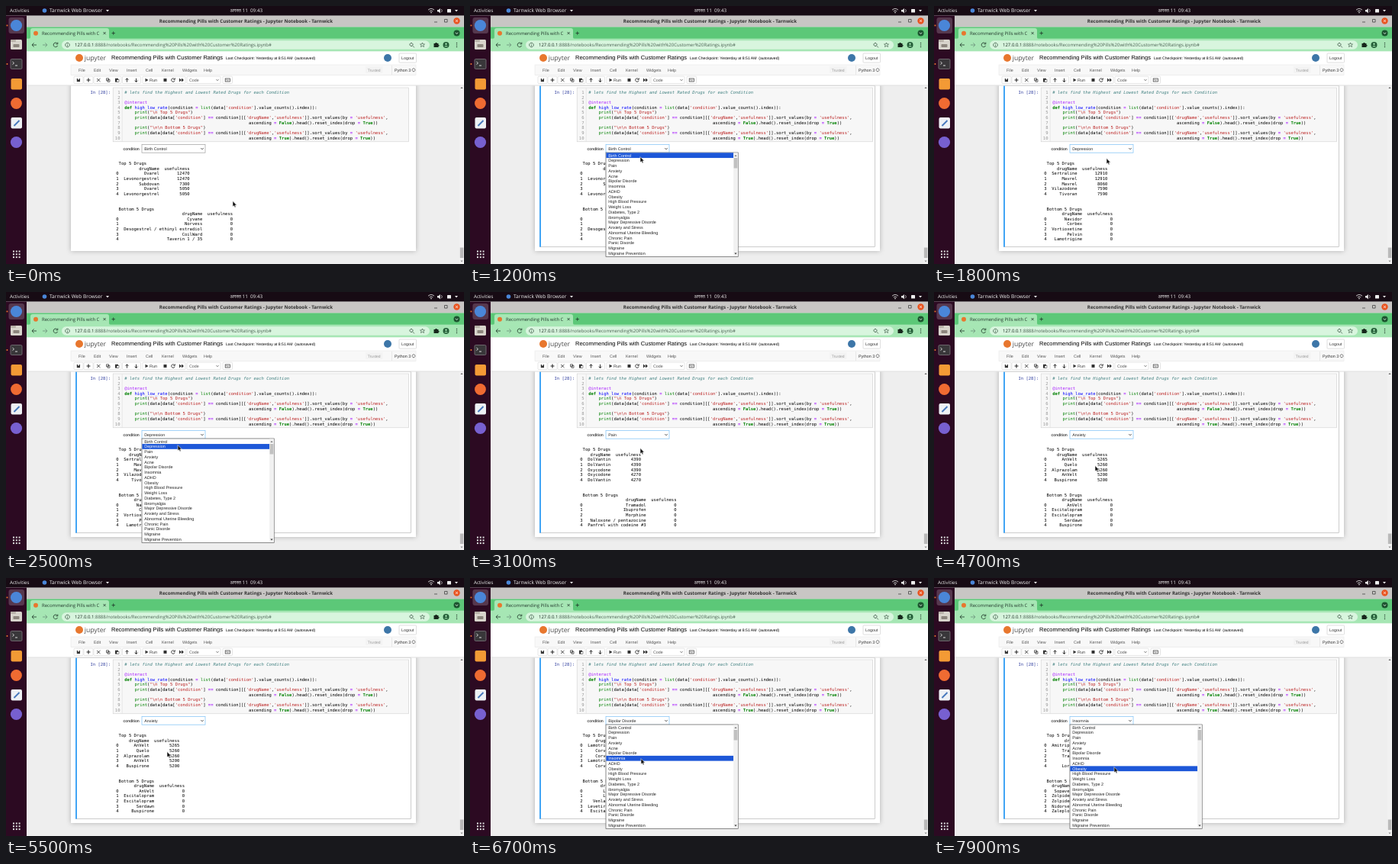
These frames come from a looping animation (600x338 px, 8000 ms). An HTML page:

```html
<!DOCTYPE html>
<html lang="en">
<head>
<meta charset="utf-8">
<title>Notebook dropdown</title>
<style>
html, body { margin: 0; width: 100%; height: 100%; overflow: hidden; background: #eee; }
svg { display: block; width: 600px; height: 338px; }
text { white-space: pre; text-rendering: geometricPrecision; }
.ui { font-family: "Open Sans", "Noto Sans", sans-serif; }
.page { font-family: "Liberation Sans", Arial, sans-serif; }
.mono { font-family: "DejaVu Sans Mono", monospace; font-size: 5.53px; }
.sheet { filter: drop-shadow(0 0 3px rgba(60, 60, 60, .35)); }
</style>
</head>
<body>
<svg id="stage" viewBox="0 0 600 338"></svg>
<script>
const stage = document.getElementById('stage');
const LOOP = 8000, STEP = 100;
const ROW = 6.76, LIST_TOP = 192.3, LINE = 6.62;
const NAME = 'Recommending Pills with Customer Ratings';
const ORANGE = '#e8772e';

const esc = s => String(s).replace(/&/g, '&amp;').replace(/</g, '&lt;');
const rect = (x, y, w, h, fill, more = '') =>
  `<rect x="${x}" y="${y}" width="${w}" height="${h}" fill="${fill}" ${more}/>`;
const dot = (x, y, r, fill, more = '') => `<circle cx="${x}" cy="${y}" r="${r}" fill="${fill}" ${more}/>`;
const line = (d, color, w = .8, more = '') =>
  `<path d="${d}" fill="none" stroke="${color}" stroke-width="${w}" ${more}/>`;
const fill = (d, color, more = '') => `<path d="${d}" fill="${color}" ${more}/>`;
const text = (x, y, s, size, color, cls = 'page', more = '') =>
  `<text x="${x}" y="${y}" font-size="${size}" fill="${color}" class="${cls}" ${more}>${esc(s)}</text>`;
const mono = (x, y, s, color = '#000', more = '') =>
  `<text x="${x}" y="${y}" fill="${color}" class="mono" ${more}>${s}</text>`;

// Output of each selected condition: two lists of [drug, usefulness].
const zeros = names => names.map(n => [n, 0]);
const pair = (names, scores) => names.map((n, i) => [n, scores[i]]);
const RESULTS = {
  'Birth Control': [
    pair(['Ovarel', 'Levonorgestrel', 'Subdovan', 'Ovarel', 'Levonorgestrel'], [12470, 12470, 7300, 5050, 5050]),
    zeros(['Cyvane', 'Norvess', 'Desogestrel / ethinyl estradiol', 'CoilWard', 'Taverin 1 / 35'])],
  'Depression': [
    pair(['Sertraline', 'Mavrel', 'Mavrel', 'Vilazodone', 'Tivoran'], [12910, 12910, 8060, 7590, 7590]),
    zeros(['Navidor', 'Corbex', 'Vortioxetine', 'Pelvin', 'Lamotrigine'])],
  'Pain': [
    pair(['DolVantin', 'DolVantin', 'Oxycodone', 'Oxycodone', 'DolVantin'], [4390, 4390, 4390, 4270, 4270]),
    zeros(['Tramadol', 'Ibuprofen', 'Morphine', 'Naloxone / pentazocine', 'Panfrel with codeine #3'])],
  'Anxiety': [
    pair(['AnVelt', 'Quelo', 'Alprazolam', 'AnVelt', 'Buspirone'], [5265, 5260, 5260, 5200, 5200]),
    zeros(['AnVelt', 'Escitalopram', 'Escitalopram', 'Serdawn', 'Buspirone'])],
  'Bipolar Disorde': [
    pair(['Lamotrigine', 'Corvetal', 'Corvetal', 'Lamotrigine', 'Corvetal'], [5510, 5510, 4380, 4380, 3920]),
    zeros(['Lithium', 'Lorvane', 'Venlafaxine', 'Levetiracetam', 'Escitalopram'])],
  'Insomnia': [
    pair(['Amitriptyline', 'Trazodone', 'Trazodone', 'Dormel', 'Lorazepam'], [4770, 4250, 4250, 3810, 3640]),
    zeros(['Sopavel', 'Zolpidem', 'Zolpidem', 'Nidorsel', 'Zaleplon'])],
};
const CONDITIONS = ['Birth Control', 'Depression', 'Pain', 'Anxiety', 'Acne', 'Bipolar Disorde', 'Insomnia',
  'ADHD', 'Obesity', 'High Blood Pressure', 'Weight Loss', 'Diabetes, Type 2', 'ibromyalgia',
  'Major Depressive Disorde', 'Anxiety and Stress', 'Abnormal Uterine Bleeding', 'Chronic Pain',
  'Panic Disorde', 'Migraine', 'Migraine Prevention'];

// time, x, y of the pointer tip
const PATH = [[0, 297, 256], [200, 294, 252], [800, 222, 188], [1000, 222, 190], [1200, 223, 198],
  [1500, 225, 203], [1800, 226, 200], [2200, 226, 188], [2300, 226, 189], [2500, 225, 201],
  [2800, 224, 209], [3100, 223, 205], [3500, 222, 188], [3600, 222, 190], [3800, 222.5, 205.5],
  [4200, 215, 216], [4500, 211, 228], [5500, 211, 228], [5800, 216, 188], [5900, 218, 196],
  [6100, 224, 230], [6400, 223, 188], [6500, 223, 190], [6700, 224, 237], [6900, 224, 237],
  [7400, 227, 188], [7500, 228, 192], [7900, 236, 248], [8000, 236, 248]];
// time, selected condition, list open
const STATES = [[0, 'Birth Control', 0], [900, 'Birth Control', 1], [1500, 'Depression', 0],
  [2300, 'Depression', 1], [2800, 'Pain', 0], [3600, 'Pain', 1], [4200, 'Anxiety', 0],
  [5800, 'Anxiety', 1], [6100, 'Bipolar Disorde', 0], [6500, 'Bipolar Disorde', 1],
  [6900, 'Insomnia', 0], [7500, 'Insomnia', 1]];

function table(rows) {
  const w = Math.max(8, ...rows.map(r => r[0].length));
  const out = (i, a, b) => `${i}  ${a.padStart(w)}  ${String(b).padStart(10)}`;
  return [out(' ', 'drugName', 'usefulness'), ...rows.map((r, i) => out(i, ...r))];
}

function output(name) {
  const [top, bottom] = RESULTS[name];
  return [' Top 5 Drugs', ...table(top), '', '', ' Bottom 5 Drugs', ...table(bottom)]
    .map((s, i) => mono(144.3, 208.2 + i * 6.6, esc(s))).join('');
}

function paint(s) {
  if (s[0] === '#') return `<tspan fill="#408080" font-style="italic">${s}</tspan>`;
  const styles = [
    [/^["']/, 'fill="#ba2121"'],
    [/^(def|True|False)$/, 'fill="#008000" font-weight="bold"'],
    [/^(print|list)$/, 'fill="#008000"'],
    [/^high_low_rate$/, 'fill="#0000ff"'],
    [/^@/, 'fill="#aa22ff"'],
    [/^=+$/, 'fill="#aa22ff" font-weight="bold"'],
  ];
  return s.replace(/"[^"]*"|'[^']*'|@?\w+|=+/g, m => {
    const hit = styles.find(([re]) => re.test(m));
    return hit ? `<tspan ${hit[1]}>${m}</tspan>` : m;
  });
}

function code() {
  const query = "    print(data[data['condition'] == condition][['drugName','usefulness']].sort_values(by = 'usefulness',";
  const tail = v => ' '.repeat(49) + `ascending = ${v}).head().reset_index(drop = True))`;
  const lines = ['# lets find the Highest and Lowest Rated Drugs for each Condition', '', '@interact',
    "def high_low_rate(condition = list(data['condition'].value_counts().index)):",
    '    print("\\n Top 5 Drugs")', query, tail('False'),
    '    print("\\n\\n Bottom 5 Drugs")', query, tail('True')];
  return rect(140.2, 107, 387.4, 70.8, '#f7f7f7', 'stroke="#cfcfcf" stroke-width=".6"') +
    line('M152.2 107.4V177.6', '#ddd', .6) +
    mono(137, 115, 'In [28]:', '#303f9f', 'text-anchor="end"') +
    lines.map((s, i) => mono(149.5, 115 + i * LINE, i + 1, '#999', 'text-anchor="end"') +
      mono(155.2, 115 + i * LINE, paint(s))).join('');
}

function desktop() {
  const white = '#eee';
  const grid = [0, 1, 2].map(r => [0, 1, 2].map(c => rect(9 + c * 3.8, 320.5 + r * 3.8, 2, 2, '#ddd')).join('')).join('');
  const tray = line('M559 5.2q4-3.4 8 0M560.8 7q2.2-1.8 4.4 0', white) + dot(563, 8.6, .8, white) +
    fill('M571 5h1.8l2-2v6.4l-2-2H571z', white) + line('M576.4 4.2q1.8 2 0 4', white, .7) +
    rect(584, 4, 5, 4.6, white, 'rx=".6"') + fill('M594 5h4l-2 2.6z', white);
  return rect(0, 0, 600, 12.5, '#170b14') + rect(0, 12.5, 27, 326, '#2c0a22') +
    text(5, 8.4, 'Activities', 6.2, white, 'ui') + dot(50.5, 6, 2.8, '#4a86d8') +
    text(57, 8.4, 'Tarnwick Web Browser', 6.6, white, 'ui') + fill('M131 5h4l-2 2.6z', white) +
    text(293.5, 8.4, 'अगस्त 11  09:43', 6.3, white, 'ui') + `<g transform="translate(-6 0)">${tray}</g>` +
    // dock
    rect(3.5, 15, 20.5, 21, '#56384e', 'rx="3"') + dot(13.5, 25.5, 7.6, '#4a86d8') +
    rect(6, 44, 15, 13, '#d8d4cc', 'rx="1.5"') + rect(6, 44, 7, 3, '#b7b1a8', 'rx="1"') +
    rect(9.5, 50, 8, 4, '#8c857d', 'rx=".8"') +
    rect(6, 69.5, 15, 13, '#39373a', 'rx="1.5" stroke="#7c777b" stroke-width=".8"') +
    line('M8.5 73l2 1.8-2 1.8M12 78h3', '#eee', .9) +
    rect(6.5, 95, 14.5, 14.5, '#f39a35', 'rx="2"') + dot(13.5, 127.5, 7.4, '#ef6b32') +
    rect(6.5, 146, 14.5, 14.5, '#eef1f5', 'rx="2"') + line('M10.5 157l7-7', '#4879bd', 2) +
    dot(13.5, 178.5, 7.6, '#7760d0') +
    dot(1.5, 25.5, 1, ORANGE) + dot(1.5, 76, 1, ORANGE) + grid;
}

function browser() {
  const dark = '#2b4735', strip = '#5cc878', bar = '#a6e6b4';
  const [host, path] = ['127.0.0.1', `:8888/notebooks/${NAME.replace(/ /g, '%20')}.ipynb#`];
  return rect(27, 12.5, 573, 15, '#c8c6c4') +
    text(314.5, 22, NAME + ' - Jupyter Notebook - Tarnwick', 6.2, '#333', 'ui', 'text-anchor="middle" font-weight="bold"') +
    line('M561 21h4M574.5 17.5h3.6v3.6h-3.6z', '#444', .8) + dot(590.5, 19.5, 4.2, '#e95420') +
    line('M589 18l3 3m0-3l-3 3', '#fff', .8) +
    rect(27, 27.5, 573, 15.5, strip) +
    fill('M30 43q2 0 2-2V32q0-3 3-3h97q3 0 3 3v9q0 2 2 2z', bar) +
    dot(39, 35.7, 3, ORANGE) + text(47, 38, NAME.slice(0, 25), 6, '#20352a', 'ui') +
    line('M127.5 34l3.2 3.2m0-3.2l-3.2 3.2M138.5 35.6h4.4m-2.2-2.2v4.4', '#20352a', .8) +
    dot(590.5, 35.5, 4, '#1d5530') + line('M588.8 34.8l1.7 1.7 1.7-1.7', '#fff') +
    rect(27, 42.7, 573, 16.6, bar) + rect(73, 45.2, 482, 11.6, '#d8f5de', 'rx="5.8"') +
    line('M40 51h-6m2.6-2.6L34 51l2.6 2.6', dark, .9) +
    line('M48 51h6m-2.6-2.6L54 51l-2.6 2.6', '#71977f', .9) +
    line('M67.3 49.3a2.8 2.8 0 1 0 .3 2.6M67.8 47.6v2.3h-2.3', dark, .9) +
    line('M80.5 48.2a2.8 2.8 0 1 1-.01 0M80.5 50.6v2M80.5 49.3v.5', dark, .7) +
    `<text x="90" y="53.2" class="ui" font-size="6" fill="#4a6152"><tspan fill="#12251a">${host}</tspan>${path}</text>` +
    line('M532.9 52.4l2 2M531 48.5a2 2 0 1 1-.01 0', dark, .8) +
    line('M545.5 48l.9 2h2.1l-1.6 1.4.6 2.1-2-1.2-2 1.2.6-2.1-1.6-1.4h2.1z', dark, .6) +
    fill('M560.5 49h2v-1h2v1h2v2h1v1.6h-1V54h-6z', '#16261b') +
    dot(576.5, 51, 4, '#235c37') + dot(576.5, 49.8, 1.2, bar) + fill('M574 53.2q2.5-2.6 5 0z', bar) +
    [48.5, 51, 53.5].map(y => dot(590.5, y, .75, dark)).join('');
}

function toolbar() {
  const ink = '#333';
  const menus = { File: 95, Edit: 115, View: 135, Insert: 158, Cell: 183, Kernel: 204, Widgets: 231, Help: 259 };
  const button = (x, w) => rect(x, 92.2, w, 9.4, '#fff', 'rx="1" stroke="#ccc" stroke-width=".5"');
  return rect(27, 59.3, 573, 45, '#fff') +
    dot(96, 68, 5, ORANGE) + text(102.8, 70.8, 'jupyter', 8.6, '#4e4e4e', 'ui') +
    text(138, 70.3, NAME, 7.5, '#000') +
    text(288, 70.3, 'Last Checkpoint: Yesterday at 8:51 AM  (autosaved)', 5.1, '#000') +
    dot(500, 68, 5, '#3d76a8') + rect(515, 62, 22.5, 12.2, '#fff', 'rx="1" stroke="#ccc" stroke-width=".6"') +
    text(526.2, 70, 'Logout', 5.3, ink, 'page', 'text-anchor="middle"') +
    rect(85, 77, 452, 13.6, '#f8f8f8', 'stroke="#e7e7e7" stroke-width=".6"') +
    Object.entries(menus).map(([s, x]) => text(x, 85.6, s, 5.4, '#555')).join('') +
    rect(471, 79.3, 22.5, 8.6, '#f3f3f3') + text(482.2, 85.5, 'Trusted', 5, '#999', 'page', 'text-anchor="middle"') +
    line('M505.5 78v12', '#ddd', .6) + text(509, 85.6, 'Python 3', 5.4, ink) + line('M534 81.8a2 2 0 1 1-.01 0', ink, .6) +
    [[89, 12], [102, 12], [115, 36], [152.5, 24], [179, 56]].map(b => button(...b)).join('') +
    rect(92.8, 95, 4.2, 4.2, ink) + rect(94, 95, 2, 1.4, '#fff') +
    line('M105.5 97h5m-2.5-2.5v5', ink, 1.2) +
    line('M119 95l4.5 4m0-4l-4.5 4', ink, .8) +
    line('M131.5 94.8h3v3h-3zM133 96.3h3v3h-3z', ink, .7) +
    rect(143, 94.8, 4, 4.8, ink) + rect(145, 96.6, 3, 3, '#fff', `stroke="${ink}" stroke-width=".5"`) +
    line('M158.5 99.6v-4.8m-2 2l2-2 2 2M170.5 94.8v4.8m-2-2l2 2 2-2', ink, 1) +
    fill('M182.5 94.8l4 2.2-4 2.2z', ink) + text(188, 99, 'Run', 5.4, ink) +
    rect(206.5, 95, 4, 4, ink) + line('M220.5 95.6a2.2 2.2 0 1 0 .5 2M221.3 94.3v2h-2', ink, .9) +
    fill('M227 94.6l3 2.4-3 2.4zM230 94.6l3 2.4-3 2.4z', ink) +
    rect(237, 92.2, 44, 9.4, '#fff', 'rx="1" stroke="#ccc" stroke-width=".5"') + text(240, 99, 'Code', 5.3, '#555') +
    line('M275.5 96.2l1.5 1.5 1.5-1.5', ink, .7) +
    button(284, 12.5) + rect(287.2, 95, 6.2, 4, '#fff', `stroke="${ink}" stroke-width=".7"`) +
    line('M288.3 96.4h4M288.8 97.8h3', ink, .6, 'stroke-dasharray=".8 .4"') +
    rect(27, 103.6, 573, .8, '#d4d4d4');
}

const chevron = (x, y) => line(`M${x - 1.6} ${y - .8}l1.6 1.6 1.6 -1.6`, '#333', .9);

function list(value, y) {
  const over = Math.floor((y - LIST_TOP) / ROW);
  const hot = over < 0 ? CONDITIONS.indexOf(value) : over;
  const rows = CONDITIONS.map((s, i) => {
    const top = LIST_TOP + i * ROW;
    return (i === hot ? rect(178.4, top, 166.8, ROW, '#1d57d8') : '') +
      text(181.3, top + 5.25, s, 5.45, i === hot ? '#fff' : '#222');
  }).join('');
  return rect(178, 192, 173.2, 136.3, '#fff', 'stroke="#555" stroke-width=".7"') + rows +
    rect(345.2, 192.4, 5.6, 135.5, '#f1f1f1') + rect(345.6, 199, 4.8, 13.5, '#c1c1c1') +
    fill('M346.4 197l1.6-2 1.6 2z', '#777') + fill('M346.4 323.5l1.6 2 1.6-2z', '#333');
}

function picker(value, active) {
  return text(153.6, 189, 'condition', 5.3, '#000') +
    rect(178, 181.6, 83, 10.6, '#fff', `stroke="${active ? '#7cc0f5' : '#9e9e9e'}" stroke-width=".7"`) +
    text(181.3, 189.2, value, 5.3, '#222') + chevron(257, 187);
}

const pointer = (x, y) => fill('M0 0v8.2l1.9-1.7 1.2 2.8 1.5-.7-1.2-2.7h2.5z', '#111',
  `transform="translate(${x} ${y - .4}) scale(.9)" stroke="#fff" stroke-width=".6"`);

const frame = rect(91.3, 104.4, 439, 211, 'none', 'stroke="#ababab" stroke-width=".6"') + rect(91, 104.2, 2, 211.4, '#42a5f5');

stage.innerHTML = rect(27, 104, 573, 234, '#eee') +
  rect(85, 100, 452, 221, '#fff', 'class="sheet"') +
  '<g id="cell"></g>' + code() + toolbar() +
  rect(594, 104.4, 6, 234, '#f1f1f1') + rect(594.8, 316.5, 4.6, 13.5, '#b9b9b9') +
  fill('M595.4 108l1.6-2 1.6 2z', '#666') + fill('M595.4 333.5l1.6 2 1.6-2z', '#888') +
  browser() + desktop() + '<g id="live"></g>';
const cell = document.getElementById('cell'), live = document.getElementById('live');

function tip(t) {
  const i = Math.max(1, PATH.findIndex(p => p[0] > t));
  const [a, b] = [PATH[i - 1], PATH[i]];
  const k = (t - a[0]) / (b[0] - a[0]);
  return [1, 2].map(n => a[n] + (b[n] - a[n]) * k);
}

let shown = -1;
function draw(now) {
  const t = Math.floor(now % LOOP / STEP) * STEP;
  if (t !== shown) {
    shown = t;
    const [, value, open] = STATES.filter(s => s[0] <= t).pop();
    const [x, y] = tip(t);
    const active = t >= STATES[1][0];
    cell.innerHTML = (active ? frame : '') + output(value) + picker(value, active);
    live.innerHTML = (open ? list(value, y) : '') + pointer(x, y);
  }
  requestAnimationFrame(() => draw(performance.now() - start));
}
const start = performance.now();
draw(0);
</script>
</body>
</html>
```
